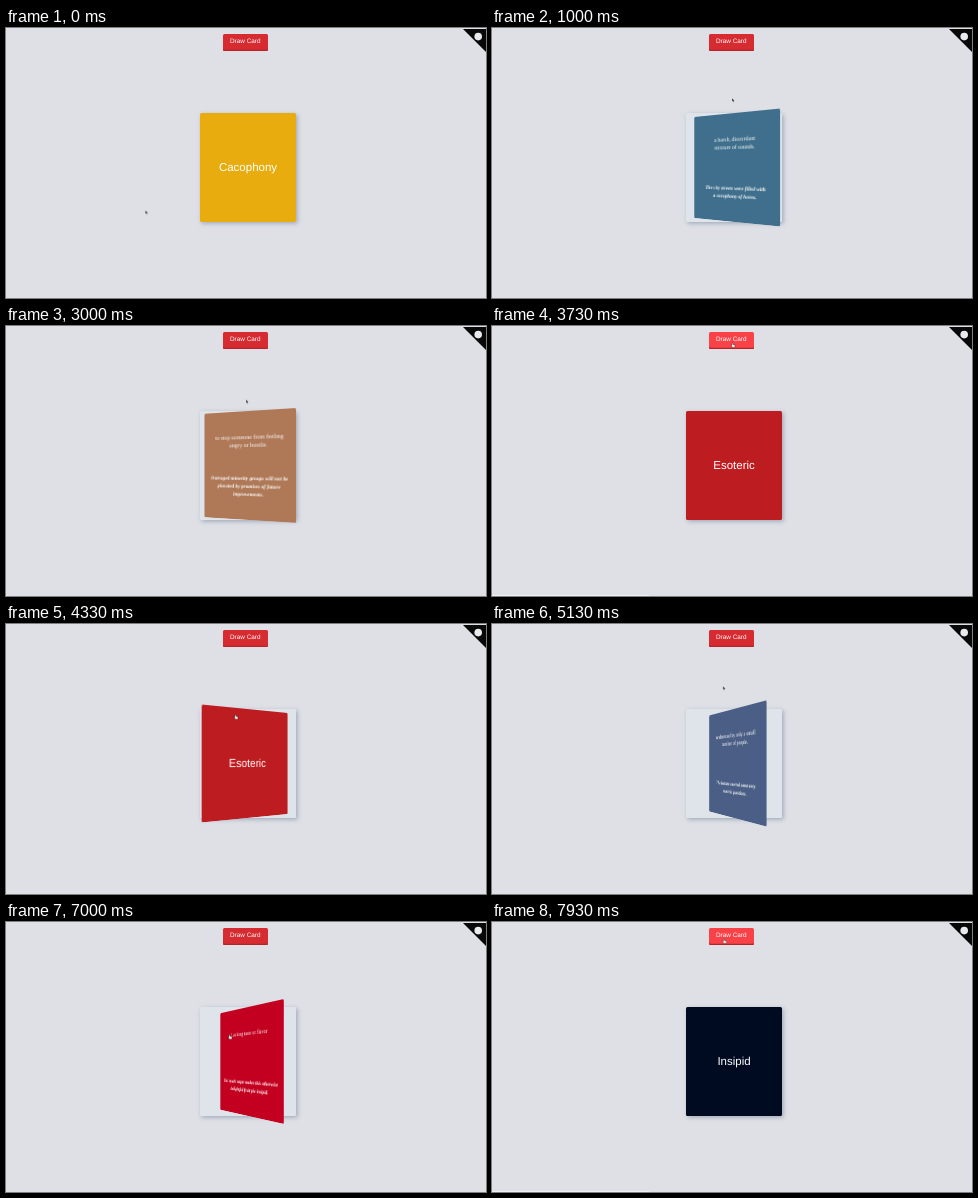
An HTML page for the animation above (8 s loop, 480 by 270 pixels).

```html
<!DOCTYPE html>
<html lang="en">
<head>
<meta charset="utf-8">
<title>Vocabulary cards</title>
<style>
  html, body { margin: 0; width: 100%; height: 100%; overflow: hidden; }
  body { background: #dee0e6; }
  #stage { position: relative; width: 480px; height: 270px; overflow: hidden; color: #fff;
    font-family: "Liberation Sans", Arial, sans-serif; text-rendering: geometricPrecision; }
  #stage div, #stage svg { position: absolute; }
  #button { left: 217px; top: 6px; width: 44.5px; height: 16.5px; border-radius: 1.5px;
    background: #d62b30; box-shadow: inset 0 -1.2px #b92228;
    font-size: 6.4px; line-height: 16.4px; text-align: center; }
  #card { left: 194px; top: 85px; width: 96px; height: 109.3px; border-radius: 1.5px;
    background: #dfe4ea; box-shadow: 1.5px 1.5px 4px rgba(60, 80, 110, .38); perspective: 283px; }
  #flipper, .face { inset: 0; }
  #flipper { transform-style: preserve-3d; }
  .face { border-radius: 1.5px; backface-visibility: hidden; text-align: center; }
  .front { font-size: 11.5px; line-height: 111px; }
  .back { transform: rotateY(180deg); white-space: pre-line;
    font-family: "Liberation Serif", "Times New Roman", serif; }
  .meaning { left: 4px; right: 4px; top: 23px; font-size: 6.1px; line-height: 8px; }
  .usage { left: 2px; right: 2px; bottom: 20.5px; font: italic bold 5.3px/8.4px "Liberation Serif", serif; }
  #status { left: 0; top: 268.5px; width: 157px; height: 1.5px; background: #eff0f2; }
  #corner { left: 457px; top: .7px; }
  #cursor { left: 0; top: 0; }
  #cursor svg { left: 0; top: 0; overflow: visible; }
</style>
</head>
<body>
<div id="stage">
  <div id="status"></div>
  <div id="button">Draw Card</div>
  <svg id="corner" width="23" height="23">
    <path d="M0 0H23V23Z" fill="#080808"/>
    <circle cx="15.2" cy="7.6" r="3.8" fill="#e8eaee"/>
  </svg>
  <div id="card"><div id="flipper"></div></div>
  <div id="cursor">
    <svg id="arrow" width="4" height="5">
      <path d="M0 0V3.6L.9 2.9L1.6 4.3L2.2 4L1.6 2.7H2.7Z" fill="#111" stroke="#fff" stroke-width=".35"/>
    </svg>
    <svg id="hand" width="4" height="5">
      <path d="M0 .2Q.5-.3 1 .2V1.5L3 2V3.4L2.5 4.4H.6L-.9 2.5L-.5 2.1L0 2.5Z"
        fill="#fff" stroke="#222" stroke-width=".45"/>
    </svg>
  </div>
</div>
<script>
const LOOP = 8000;
const FLIP = 500;
const REACH = 150;   // pointer travel from button to card
const RETURN = 300;  // and back again
const $ = id => document.getElementById(id);

// visit: when the pointer enters and leaves the card, and at which x
const cards = [
  { word: "Cacophony", from: 0, front: "#e9ac0e", back: "#3f6f8c",
    visit: { enter: 330, leave: 935, x: 240 },
    meaning: "a harsh, discordant\nmixture of sounds.",
    usage: "The city streets were filled with\na cacophony of horns." },
  { word: "Placate", from: 2080, front: "#4d7f6c", back: "#af7857",
    visit: { enter: 2400, leave: 2950, x: 240 },
    meaning: "to stop someone from feeling\nangry or hostile.",
    usage: "Outraged minority groups will not be\nplacated by promises of future\nimprovements." },
  { word: "Esoteric", from: 3690, front: "#bd1d20", back: "#4b5f86",
    visit: { enter: 4265, leave: 5030, x: 229 },
    meaning: "understood by only a small\nnumber of people.",
    usage: "The lecture covered some very\nesoteric questions." },
  { word: "Mercurial", from: 5620, front: "#dcdd98", back: "#7b6a92",
    meaning: "changing mood suddenly.",
    usage: "His mercurial temper made him\nhard to work with." },
  { word: "Insipid", from: 6220, front: "#000a20", back: "#c30020",
    visit: { enter: 6785, leave: 7300, x: 223 },
    meaning: "Lacking taste or flavor",
    usage: "Too much sugar makes this otherwise\ndelightful fruit pie insipid." }
];

// steps: [time, value, easing to the next step]
function track(el, prop, steps) {
  const list = steps.slice();
  const last = list[list.length - 1];
  if (last[0] < LOOP) list.push([LOOP, last[1]]);
  const frames = list.map(([time, value, easing = "linear"]) =>
    ({ offset: time / LOOP, [prop]: value, easing }));
  return el.animate(frames, { duration: LOOP, iterations: Infinity });
}

function toggle(el, prop, off, on, spans) {
  const steps = spans[0][0] > 0 ? [[0, off, "step-end"]] : [];
  for (const [start, end] of spans) {
    steps.push([start, on, "step-end"]);
    if (end < LOOP) steps.push([end, off, "step-end"]);
  }
  return track(el, prop, steps);
}

function add(parent, className, text = "") {
  const el = document.createElement("div");
  el.className = className;
  el.textContent = text;
  return parent.appendChild(el);
}

const anims = [];

cards.forEach((c, i) => {
  const front = add($("flipper"), "face front", c.word);
  const back = add($("flipper"), "face back");
  front.style.background = c.front;
  back.style.background = c.back;
  add(back, "meaning", c.meaning);
  add(back, "usage", c.usage);
  const to = i + 1 < cards.length ? cards[i + 1].from : LOOP;
  for (const face of [front, back])
    anims.push(toggle(face, "visibility", "hidden", "visible", [[c.from, to]]));
});

// Each visit flips the card over and back; between visits the pointer rests on the button
const turn = deg => `rotateY(${deg}deg)`;
const place = (x, y) => `translate(${x}px, ${y}px)`;
const visits = cards.map(c => c.visit).filter(Boolean);
let home = place(139.3, 182.3);
const flips = [[0, turn(0)]];
const path = [[0, home]];
const overCard = [], overButton = [];

visits.forEach(({ enter, leave, x }, i) => {
  const next = visits[i + 1];
  flips.push([enter, turn(0), "ease"], [enter + FLIP, turn(180)],
    [leave, turn(180), "ease"], [leave + FLIP, turn(0)]);
  path.push([enter - REACH, home], [enter, place(x, 85)],
    [(enter + leave) / 2, place(x, 118)], [leave, place(x, 85)]);
  home = place((x + 240) / 2, 17);
  path.push([leave + RETURN, home]);
  overCard.push([enter, leave]);
  overButton.push([leave + RETURN * .9, next ? next.enter - REACH * .9 : LOOP]);
});

const overAny = [...overButton, ...overCard].sort((a, b) => a[0] - b[0]);

anims.push(
  track($("flipper"), "transform", flips),
  track($("cursor"), "transform", path),
  toggle($("button"), "backgroundColor", "#d62b30", "#f94248", overButton),
  toggle($("status"), "visibility", "hidden", "visible", overButton),
  toggle($("hand"), "visibility", "hidden", "visible", overAny),
  toggle($("arrow"), "visibility", "visible", "hidden", overAny)
);

// Start every track on the same tick
const start = document.timeline.currentTime || 0;
for (const a of anims) a.startTime = start;
</script>
</body>
</html>
```
